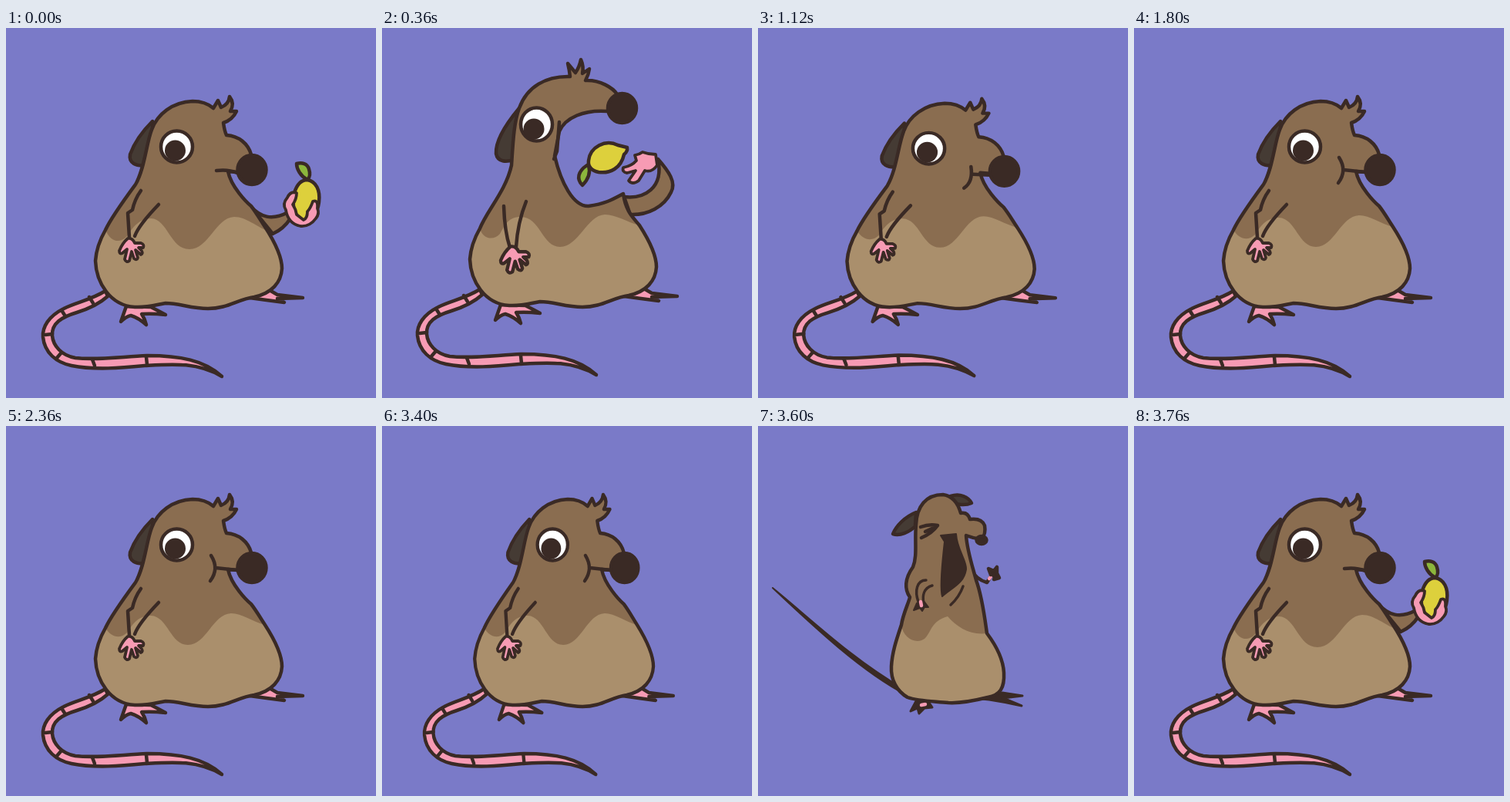
An HTML page that plays this animation: 480x480 px, repeating every 3880 ms.

```html
<!DOCTYPE html>
<html lang="en">
<head>
<meta charset="utf-8">
<title>Sour lemon</title>
<style>
html, body { margin: 0; width: 100%; height: 100%; overflow: hidden; background: #7a7ac8; }
svg { display: block; width: 100vw; height: 100vh; }
</style>
</head>
<body>
<svg id="stage" viewBox="0 0 480 480" fill="none" stroke="#3a2a25" stroke-width="4.5" stroke-linecap="round" stroke-linejoin="round"></svg>
<script>
const DARK = '#3a2a25', BROWN = '#8a6d50', TAN = '#aa8f6c', PINK = '#f79bb4',
  EAR = '#453b34', LEMON = '#ddd03c', LEAF = '#8cb63c';

const path = (d, fill = 'none', extra = '') => `<path d="${d}" fill="${fill}" ${extra}/>`;
const oval = (x, y, rx, ry, fill, extra = '') =>
  `<ellipse cx="${x}" cy="${y}" rx="${rx}" ry="${ry}" fill="${fill}" ${extra}/>`;
const group = (transform, content) => `<g transform="${transform}">${content}</g>`;
const bare = 'stroke="none"';

// Fur: "top" runs from the left end of the belly line over the head to its
// right end, "bottom" closes the outline, "wave" is the belly line itself.
const fur = (start, top, end, bottom, wave) =>
  path(`M${start}${top}${bottom}Z`, BROWN, bare) +
  path(`M${end}${bottom}${wave}Z`, TAN, bare) +
  path(`M${start}${top}${bottom}Z`);

const START = '129 262', END = '336 258';
const seat = 'C347 275 358 295 358 312C357 330 345 344 322 349C300 352 288 364 262 364' +
  'C240 364 225 357 207 357C195 359 183 363 167 362C135 360 117 330 116 302C117 288 121 276 129 262';
const wave = 'C136 274 148 277 157 268C165 256 172 246 188 246C210 247 213 284 236 284' +
  'C260 284 268 244 292 243C306 243 320 254 336 258';
const holdWave = 'C136 278 148 280 157 270C165 258 172 248 188 247C210 248 213 287 238 287' +
  'C263 287 272 246 296 245C312 245 325 258 339 263';
const gapeWave = 'C132 275 146 279 155 269C162 257 166 247 182 247C207 247 210 286 233 286' +
  'C257 286 268 245 291 244C306 244 320 254 336 258';
const calmTop = 'C137 245 154 222 168 203C180 182 182 150 189 132C196 112 216 96 242 95' +
  'C252 95 262 98 269 104L275 94L279 103Q289 99 290 89Q297 98 291 108L299 108Q294 119 282 123' +
  'C283 130 284 135 286 139C302 140 314 150 318 164L300 187L288 186' +
  'C292 206 312 226 318 231C325 240 330 249 336 258';
const gapeTop = 'C138 239 163 213 170 180C172 150 173 125 180 106C190 78 215 64 246 65' +
  'Q245 56 243 48L253 60Q258 53 260 43Q264 52 262 61L271 55Q270 63 266 70C285 69 302 80 307 88L294 110' +
  'C264 108 240 118 232 136L226 168C234 202 250 234 270 233C292 230 302 224 315 217' +
  'C318 240 328 248 336 258';

const tailAndFeet =
  path('M129 341C110 353 90 356 75 364C55 374 47 388 48 401C50 421 65 434 85 438' +
    'C115 444 150 441 180 438C215 436 248 433 280 452C258 431 225 425 183 425' +
    'C145 427 115 431 90 428C72 425 61 412 60 399C59 383 72 375 92 369C108 364 122 357 132 348Z', PINK) +
  path('M108 349L113 357M72 366L77 374M51 398L60 397M66 428L72 421M112 430L115 438M182 427L183 437') +
  path('M156 361L149 381Q156 374 162 373Q172 376 182 385Q180 377 176 371Q190 370 207 372Q198 367 188 362Z', PINK) +
  path('M316 350Q330 340 340 339L352 346L385 350L352 351L361 356L338 353Z', PINK);

const hand = path('M158 273Q151 279 147 289Q147 294 151 292L157 287L154 300Q156 305 160 302L163 290' +
  'L166 299Q170 302 171 298L168 288L175 294Q178 293 176 289L172 285L178 285' +
  'Q180 281 175 279L167 279Q164 272 158 273Z', PINK, 'stroke-width="3.8"');

const eye = (x, y, rx, ry, px, py, r) => oval(x, y, rx, ry, '#fff') + oval(px, py, r, r, DARK, bare);

const calm = (behind, mouth, belly) =>
  tailAndFeet + behind +
  path('M190 121C180 131 167 147 161 164C159 175 168 180 183 178L190 140Z', EAR) +
  fur(START, calmTop, END, seat, belly) +
  path('M175 211Q167 222 164 236L158 240L160 272M198 229Q172 256 167 270') + hand +
  eye(221.5, 154, 20.5, 20.5, 219.5, 159, 13.5) +
  path(mouth) + oval(319, 184, 18.5, 19, DARK);

const heldLemon =
  path('M316 230C330 246 345 250 366 239L369 247C362 258 355 263 346 267Z', BROWN) +
  path('M391 197C382 192 377 183 377 176C384 174 391 176 393 183C395 189 395 193 391 197Z', LEAF) +
  path('M391 197C402 199 408 210 406 226C404 242 395 252 386 250C375 246 370 232 374 214C377 204 382 197 391 197Z', LEMON) +
  path('M363 236Q358 228 365 220Q369 211 377 214Q377 222 372 229Q376 235 377 242L386 249' +
    'Q391 247 391 238Q395 234 398 225Q405 222 404 234Q407 241 402 247Q394 258 382 257Q366 254 363 236Z',
    PINK, 'stroke-width="3.8"');

const gape =
  group('translate(-2 -2)', tailAndFeet) +
  path('M314 219C340 222 366 208 358 170C372 186 382 200 375 213C366 232 345 243 322 242Z', BROWN) +
  path('M178 104C163 122 147 146 148 163C150 174 161 174 171 171L176 130Z', EAR) +
  group('translate(-2 -2)', fur(START, gapeTop, END, seat, gapeWave)) +
  path('M230 122L227 160L223 170M158 231Q159 264 166 285M187 225Q176 252 174 284') +
  group('translate(-18 -25) scale(1.17 1.13)', hand) +
  eye(200.5, 125, 20.5, 21.5, 197, 131, 13.5) +
  oval(311.5, 104, 18.5, 19, DARK) +
  path('M266 178C254 186 252 196 260 204C268 196 271 188 268 178Z', LEAF) +
  path('M268 172C270 154 290 144 306 152L318 155Q319 160 314 164C310 182 296 189 281 187C272 185 267 180 268 172Z', LEMON) +
  path('M330 172L328 165Q334 164 338 161Q346 164 355 164L357 178Q350 188 341 185L333 198Q325 204 320 198' +
    'L329 185L318 188Q311 187 313 181Q324 179 330 172Z', PINK, 'stroke-width="3.8"');

const sour =
  path('M19 210C66 248 120 301 189 341L193 349C136 320 72 260 19 210Z', DARK, 'stroke-width="2"') +
  path('M176 334L185 341', 'none', `stroke="${PINK}" stroke-width="2"`) +
  path('M205 112C190 118 179 130 175 140C184 143 196 138 204 130Z', EAR) +
  path('M250 91C262 87 273 92 277 100C270 103 258 103 250 98Z', EAR) +
  path('M205 357L198 370L207 366L209 373L216 366L226 365L220 356Z', DARK, 'stroke-width="3"') +
  path('M212 362L217 361', 'none', `stroke="${PINK}"`) +
  path('M290 354L317 346L343 350L318 353L342 363Q320 358 300 355Z', DARK, 'stroke-width="3"') +
  path('M277 187Q283 199 297 203L304 192') +
  fur('186 258', 'C188 244 196 228 197 222C190 212 190 198 201 183C207 168 203 150 205 128' +
    'C206 104 218 89 240 89C254 91 260 102 263 113Q272 111 275 121Q290 119 294 129Q296 140 290 147' +
    'Q280 146 270 142C271 160 277 178 283 200C291 222 294 248 297 269', '297 269',
    'C306 281 318 301 319 320C320 340 314 349 298 352C282 356 264 360 247 359C228 357 208 357 194 352' +
    'C180 344 172 329 173 312C174 293 180 276 186 258',
    'C188 275 205 284 216 276C225 268 224 253 246 247C258 261 276 272 297 269') +
  path('M237 142L257 140C258 160 271 175 270 186C267 204 254 208 239 221C235 208 240 170 242 150Z', DARK, 'stroke-width="2"') +
  path('M211 131Q222 127 233 129Q226 139 212 145M217 137L230 131') +
  path('M208 228C203 214 206 200 218 200M226 207C215 210 213 220 215 230M266 208Q261 222 250 232', 'none', 'stroke-width="3.5"') +
  path('M206 230L202 239L210 236L213 240L216 235L221 235L215 227Z', DARK, 'stroke-width="2"') +
  path('M211 228L212 233M300 198L303 194', 'none', `stroke="${PINK}"`) +
  path('M302 193L299 185L306 188L310 183L310 191L313 197L306 199', DARK) +
  oval(290, 148, 6.5, 5, DARK);

const poses = {
  hold: calm(heldLemon, 'M273 185Q288 183 300 188', holdWave),
  gape,
  chew: calm('', 'M266 168Q277 185 265 201M272 184L300 187', wave),
  bite: calm('', 'M276 178Q279 198 267 206M279 188L300 189', wave),
  sour
};

// start in ms, pose, horizontal and vertical scale
const beats = [
  [0, 'hold', 1, 1], [360, 'gape', 1, 1], [480, 'bite', 1.005, .99], [560, 'chew', 1, 1],
  [1120, 'bite', 1.005, .99], [1360, 'chew', 1, 1], [1560, 'bite', 1.005, .99],
  [1800, 'chew', 1, 1], [2120, 'bite', 1.005, .99], [2360, 'chew', 1, 1],
  [3400, 'chew', .958, 1], [3440, 'chew', .85, 1.01], [3480, 'chew', .7, 1.02],
  [3520, 'sour', .98, 1.035], [3560, 'sour', .99, 1.015], [3600, 'sour', 1, 1],
  [3640, 'sour', .99, 1.015], [3680, 'sour', .98, 1.035], [3720, 'hold', .85, 1.01],
  [3760, 'hold', 1, 1]
];
const LOOP = 3880;

const stage = document.getElementById('stage');
stage.innerHTML = Object.entries(poses).map(([name, art]) => `<g id="${name}">${art}</g>`).join('');
const layers = [...stage.children];
const origin = performance.now();

function draw() {
  const t = (performance.now() - origin) % LOOP;
  const [, pose, sx, sy] = beats.findLast(beat => beat[0] <= t);
  for (const layer of layers) {
    layer.style.display = layer.id === pose ? '' : 'none';
    layer.setAttribute('transform', `translate(216 370) scale(${sx} ${sy}) translate(-216 -370)`);
  }
  requestAnimationFrame(draw);
}
draw();
</script>
</body>
</html>
```
